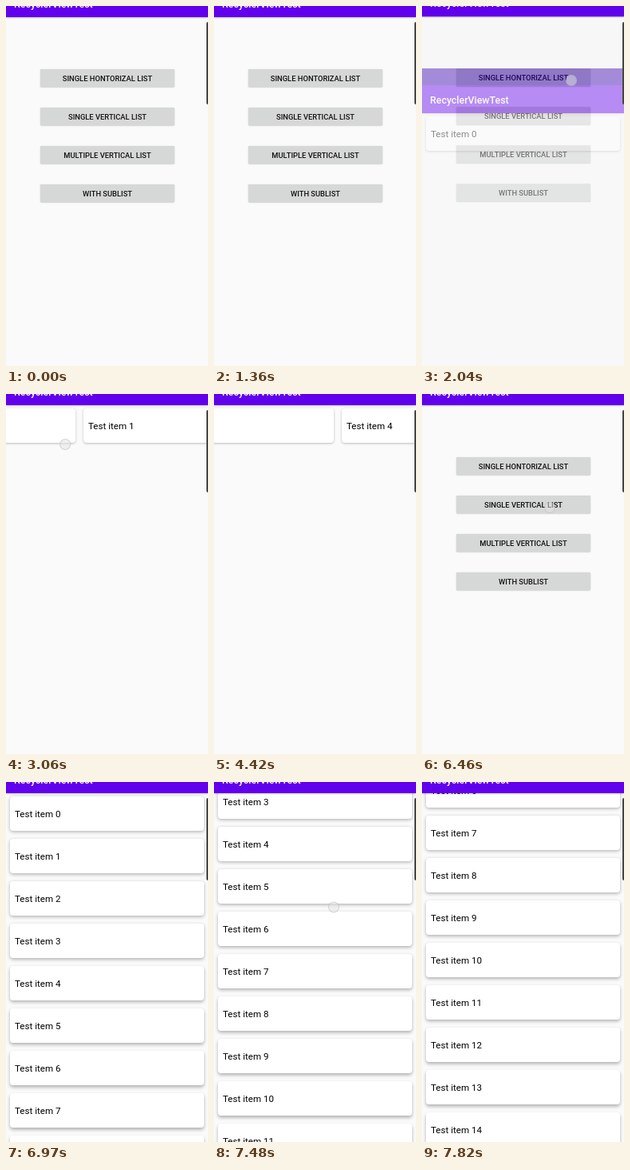
Recreate the animation shown at these times as an HTML page. Size 253 by 450 pixels, loop 7990 ms.

```html
<!DOCTYPE html>
<html lang="en">
<head>
<meta charset="utf-8">
<title>List demo</title>
<style>
  html, body { margin: 0; width: 100%; height: 100%; overflow: hidden; background: #000; }
  body { position: relative; font-family: Roboto, sans-serif; }
  div { position: absolute; box-sizing: border-box; white-space: nowrap; }
  /* Each window starts above the stage: the status bar is normally out of view. */
  .window { left: 0; top: -42px; width: 253px; height: 520px; background: #fafafa; overflow: hidden; }
  .status { width: 253px; height: 21px; background: #3700b3; z-index: 2; }
  .toolbar { top: 21px; width: 253px; height: 35px; padding-left: 10px; background: #6200ee; color: #fff;
    font-weight: 500; font-size: 12.4px; line-height: 37px; box-shadow: 0 1px 2px rgba(0,0,0,.2); z-index: 2; }
  .button { left: 43px; width: 168px; height: 22px; border-radius: 1px; background: #d6d7d7; color: #111;
    font-weight: 500; font-size: 9.35px; line-height: 23px; text-align: center; box-shadow: 0 .5px 1.5px rgba(0,0,0,.25); }
  .card { left: 5px; top: 60px; width: 243px; height: 43px; padding-left: 6px; border-radius: 4px;
    background: #fff; color: #000; font-size: 11.6px; line-height: 44px; }
  #dim { inset: 0; background: #000; }
  #touch { left: -7px; top: -7px; width: 14px; height: 14px; border-radius: 50%;
    background: rgba(228,228,228,.5); border: 1px solid rgba(170,170,170,.4); }
  #edge { left: 251px; top: 20px; width: 4px; height: 103px; border-radius: 2px 0 0 2px; background: #444; }
</style>
</head>
<body>
<div id="menu" class="window"></div>
<div id="dim"></div>
<div id="list" class="window"></div>
<div id="touch"></div>
<div id="edge"></div>
<script>
const LOOP = 7990, STEP = 170, SLIDE = 400;
const OPEN_ROW = 1960, CLOSE_ROW = 5610, OPEN_COLUMN = 6550;
const $ = id => document.getElementById(id);
const menu = $('menu'), dim = $('dim'), list = $('list'), touch = $('touch');

function add(parent, className, text = '') {
  const el = document.createElement('div');
  el.className = className;
  el.textContent = text;
  return parent.appendChild(el);
}

for (const win of [menu, list]) {
  add(win, 'status');
  add(win, 'toolbar', 'RecyclerViewTest');
}
['SINGLE HONTORIZAL LIST', 'SINGLE VERTICAL LIST', 'MULTIPLE VERTICAL LIST', 'WITH SUBLIST']
  .forEach((label, i) => add(menu, 'button', label).style.top = 121 + 48 * i + 'px');
const cards = Array.from({ length: 17 }, (_, i) => add(list, 'card', 'Test item ' + i));

// A swipe drags the list under the finger, then lets it glide to a stop.
const swipe = (start, distance, duration = 850) => ({ start, distance, duration, hold: 380 });
const rowSwipes = [swipe(2680, 382), swipe(3570, 475), swipe(4590, 306)];
const columnSwipes = [swipe(7140, 347, 680)];

const clamp = v => Math.min(1, Math.max(0, v));
const smooth = p => p * p * (3 - 2 * p);
const travel = (s, t) => s.distance * smooth(clamp((t - s.start) / s.duration));
const scrolled = (swipes, t) => swipes.reduce((sum, s) => sum + travel(s, t), 0);
const move = (el, x, y) => el.style.transform = `translate(${x}px, ${y}px)`;

const tap = (start, x, y) => ({ start, hold: 340, at: () => [x, y] });
const touches = [
  tap(1700, 187, 93),
  tap(6290, 160, 142),
  ...rowSwipes.map(s => ({ ...s, at: t => [235 - travel(s, t), 67 - 4 * smooth(clamp((t - s.start) / s.hold))] })),
  ...columnSwipes.map(s => ({ ...s, at: t => [150, 330 - travel(s, t)] }))
];

function drawWindows(t) {
  const closing = t >= CLOSE_ROW && t < OPEN_COLUMN;
  const start = closing ? CLOSE_ROW : t < CLOSE_ROW ? OPEN_ROW : OPEN_COLUMN;
  const p = clamp((t - start) / SLIDE);
  const covered = closing ? 1 - p : p * p;
  move(menu, 0, -19 * covered);
  dim.style.opacity = .34 * covered;
  move(list, 0, Math.round(closing ? 283 * p * p : 187.5 * (1 - p) ** 2));
  list.style.opacity = closing ? 1 - clamp((p - .5) / .35) : clamp((t - start) / 186);
}

function drawCards(t) {
  const vertical = t >= OPEN_COLUMN;
  const offset = Math.round(scrolled(vertical ? columnSwipes : rowSwipes, t));
  cards.forEach((card, i) => {
    const along = (vertical ? 53 : 253) * i - offset;
    move(card, vertical ? 0 : along, vertical ? along : 0);
    const depth = vertical ? 1.2 + clamp(along / 400) * 1.5 : 1;
    card.style.boxShadow = `0 ${depth}px ${vertical ? 4 : 3}px rgba(0,0,0,${vertical ? .3 : .25})`;
  });
}

function drawTouch(t) {
  const active = touches.find(({ start, hold }) => t >= start && t <= start + hold);
  touch.style.visibility = active ? 'visible' : 'hidden';
  if (active) move(touch, ...active.at(t));
}

const began = performance.now();
function frame() {
  const elapsed = Math.max(0, performance.now() - began) % LOOP;
  const t = Math.floor(elapsed / STEP) * STEP;
  drawWindows(t);
  drawCards(t);
  drawTouch(t);
  requestAnimationFrame(frame);
}
frame();
</script>
</body>
</html>
```
